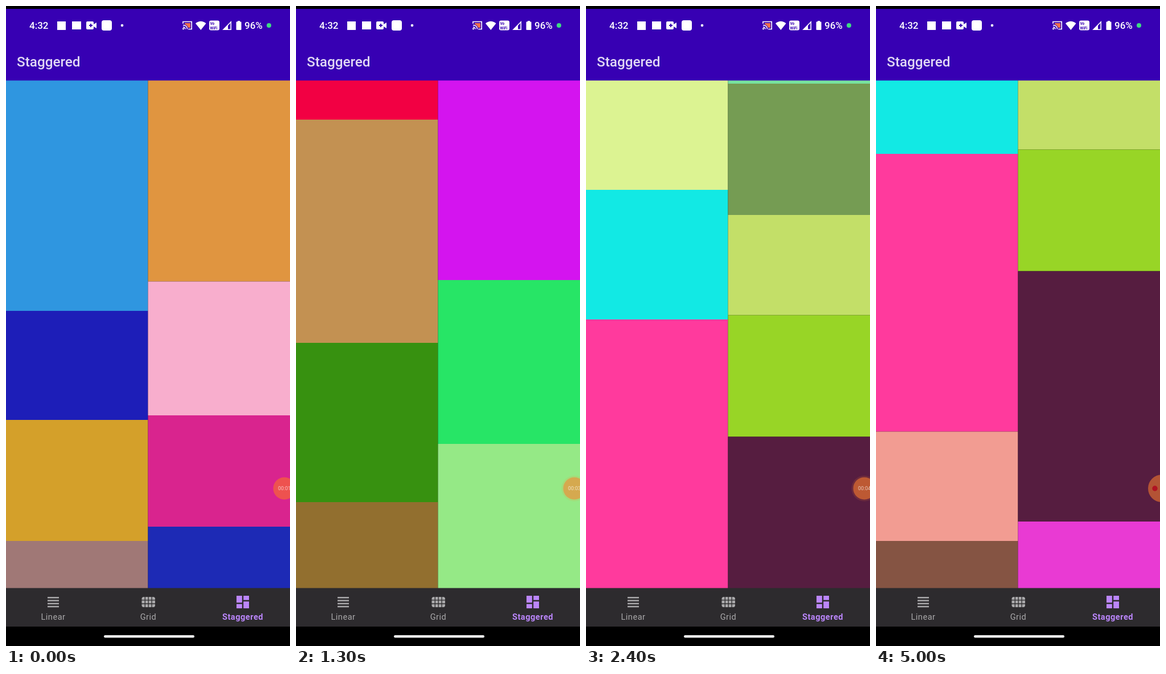
Write an HTML page that moves like this. It is 499 px wide and 1121 px high and loops after 5.5 s.

```html
<!DOCTYPE html>
<html lang="en">
<head>
<meta charset="utf-8">
<title>Staggered list</title>
<style>
  html, body { margin: 0; width: 100%; height: 100%; overflow: hidden; background: #000; }
  svg { display: block; width: 499px; height: 1121px; font-family: Roboto, sans-serif; font-weight: 500; }
  .label { font-size: 14.6px; font-weight: 400; letter-spacing: .5px; text-anchor: middle; }
</style>
</head>
<body>
<svg viewBox="0 0 499 1121">
  <rect y="130" width="499" height="890" fill="#111013"/>
  <g id="content">
    <g id="tiles"></g>
    <g id="newTiles">
      <rect y="5460" width="249.5" height="100" fill="#855443"/>
      <rect x="249.5" y="5426" width="249.5" height="134" fill="#e93ad3"/>
    </g>
    <path id="spinner" fill="none" stroke="#2ad2c2" stroke-width="5"/>
  </g>

  <!-- Recorder bubble -->
  <circle id="halo" r="22.5" cx="489" cy="845" fill="#ff802d" opacity=".13"/>
  <circle id="bubble" cy="845"/>
  <text id="timer" x="478" y="848" font-size="9" font-weight="400" fill="#fff" fill-opacity=".65"></text>
  <circle id="stopDot" cx="490" cy="845" r="4.7" fill="#b01222"/>

  <!-- Status and title bars -->
  <rect width="499" height="130.5" fill="#3700b3"/>
  <rect width="499" height="5"/>
  <g fill="#fff" font-size="17">
    <text x="41" y="40">4:32</text>
    <rect x="90" y="27" width="15" height="15"/>
    <rect x="116" y="27" width="16" height="14"/>
    <path d="M143 27h9q2 0 2 2v3l5-3v10l-5-3v3q0 2-2 2h-9q-2 0-2-2v-10q0-2 2-2z"/>
    <path d="M146 33h2v-2h2v2h2v2h-2v2h-2v-2h-2z" fill="#3700b3"/>
    <rect x="168" y="25" width="18" height="18" rx="4"/>
    <circle cx="204" cy="34" r="2.3"/>
    <path d="M314 30h10v8h-4q-2-5-6-6z" fill="#f0704c"/>
    <path d="M311 31v-3.500h15.200v13h-6M311 33.500q7 0 7.500 7M311 37q3.500 0 4 3.500" fill="none" stroke="#fff" stroke-width="1.6"/>
    <circle cx="311.500" cy="40" r="1.4"/>
    <path d="M333 30.500q9.200-7.500 18.500 0l-9.200 11.500z"/>
    <rect x="357" y="25.500" width="18" height="17" rx="3"/>
    <g fill="#3700b3" font-size="6.5" font-weight="700"><text x="358.500" y="33">Vo</text><text x="358.500" y="40.500">WiFi</text></g>
    <path d="M382 41.200L395.200 28v13.200z" fill="none" stroke="#fff" stroke-width="1.6"/>
    <path d="M381 42l9-9v9z"/>
    <path d="M407 26h4v1.500h1.500q1 0 1 1v12.500q0 1-1 1h-7q-1 0-1-1v-12.500q0-1 1-1h1.500z"/>
    <text x="419" y="40">96%</text>
  </g>
  <circle cx="462" cy="34" r="4" fill="#3ddc84"/>
  <text x="19" y="106" font-size="24.3" fill="#e1d8f4">Staggered</text>

  <!-- Bottom navigation -->
  <rect y="1019.500" width="499" height="68" fill="#2d2b2e"/>
  <rect y="1087" width="499" height="34"/>
  <rect x="172" y="1102" width="159" height="4.500" rx="2.2" fill="#ececec"/>
  <g fill="#a9a8aa">
    <path d="M73 1035h20v2.500h-20zm0 5.300h20v2.500h-20zm0 5.300h20v2.500h-20zm0 5.200h20v2.500h-20z"/>
    <rect x="238.500" y="1035" width="23.500" height="18" rx="3.500"/>
    <path d="M238 1040.700h24.500M238 1047h24.500M244.300 1035v18M250.200 1035v18M256.100 1035v18" stroke="#2d2b2e" stroke-width="1.3"/>
    <text class="label" x="83" y="1075">Linear</text>
    <text class="label" x="250" y="1075">Grid</text>
  </g>
  <g fill="#bb86fc">
    <path d="M405 1033h9.800v12h-9.800zm0 14.500h9.800v7.500h-9.800zm12.200-14.500h9.800v7.500h-9.800zm0 10h9.800v12h-9.800z"/>
    <text class="label" x="416" y="1075" style="font-weight:700">Staggered</text>
  </g>
</svg>
<script>
const LOOP = 5500, STEP = 100;
const $ = id => document.getElementById(id);

// Each tile: bottom edge in the scrolled content, colour.
const columns = [
  [[534, '#2f96e0'], [725, '#1d1eb8'], [937, '#d4a02a'], [1250, '#a07876'],
   [1449, '#78063a'], [1891, '#2706d7'], [2089, '#f20043'], [2480, '#c39152'],
   [2759, '#379110'], [3019, '#926f2f'], [3287.5, '#f529bb'], [3587, '#1f4889'],
   [3856.5, '#ad3eab'], [4166, '#fcf5dc'], [4555, '#dcf392'], [4782, '#12e9e4'],
   [5268.5, '#ff3a9d'], [5460, '#f29c92']],
  [[482.5, '#e09540'], [717, '#f8aecd'], [912, '#d9248e'], [1230, '#1d2ab5'],
   [1476, '#0c5c02'], [1968.5, '#a90f1c'], [2370, '#d414ef'], [2657, '#27e566'],
   [3077, '#95e986'], [3250, '#e90e2f'], [3650, '#91cc5d'], [3881, '#bba9d9'],
   [4124, '#99d2d4'], [4369, '#78e29e'], [4599, '#759c53'], [4774.5, '#c3df68'],
   [4987.5, '#98d526'], [5426, '#561d40']]
];
$('tiles').innerHTML = columns.map((tiles, col) => {
  let top = 130;
  return tiles.map(([bottom, fill]) => {
    const rect = `<rect x="${col * 249.5}" y="${top}" width="249.5" height="${bottom - top}" fill="${fill}"/>`;
    top = bottom;
    return rect;
  }).join('');
}).join('');

// Time and scroll offset
const scrollKeys = [[500, 0], [600, 180], [900, 1200], [1200, 1750], [1700, 2450], [2100, 3550],
  [2400, 4233], [2500, 4370], [2600, 4460], [2700, 4508], [2800, 4523]];
function scrollAt(t) {
  if (t <= 500) return 0;
  const i = scrollKeys.findIndex(key => key[0] >= t);
  if (i < 0) return 4523;
  const [t0, y0] = scrollKeys[i - 1], [t1, y1] = scrollKeys[i];
  return y0 + (y1 - y0) * (t - t0) / (t1 - t0);
}

const clamp = x => Math.max(0, Math.min(1, x));
const smooth = x => x * x * (3 - 2 * x);

function spinnerPath(t) {
  const u = ((t - 2533.5 + 2 * 1333) % 1333) / 1333;
  const turn = 58 + .162 * (t - 3200) + 90 * (u - .5);
  const from = turn + 270 * smooth(clamp(2 * u - 1));
  const to = turn + 10 + 263 * smooth(clamp(2 * u));
  const point = deg => {
    const a = deg * Math.PI / 180;
    return `${249.5 + 21.5 * Math.cos(a)} ${5501.5 + 21.5 * Math.sin(a)}`;
  };
  return `M${point(from)}A21.5 21.5 0 ${to - from > 180 ? 1 : 0} 1 ${point(to)}`;
}

const show = (id, visible) => $(id).style.display = visible ? '' : 'none';

function draw(t) {
  $('content').setAttribute('transform', `translate(0 ${-scrollAt(t)})`);
  $('newTiles').setAttribute('opacity', clamp((t - 4700) / 300));
  show('spinner', t < 4800);
  $('spinner').setAttribute('d', spinnerPath(t));

  const stopped = t >= 3800;
  show('halo', t >= 100 && !stopped);
  show('timer', !stopped);
  show('stopDot', stopped);
  $('bubble').setAttribute('cx', stopped ? 502 : 489);
  $('bubble').setAttribute('r', stopped ? 24 : 19.5);
  $('bubble').setAttribute('fill', t < 100 ? '#ee524f' : 'rgba(255,128,45,.55)');
  $('timer').textContent = '00:0' + (1 + [100, 1200, 2300, 3300].filter(at => t >= at).length);
}

const start = performance.now();
function frame() {
  const t = (performance.now() - start) % LOOP;
  draw(Math.min(5000, Math.floor(t / STEP) * STEP));
  requestAnimationFrame(frame);
}
frame();
</script>
</body>
</html>
```
